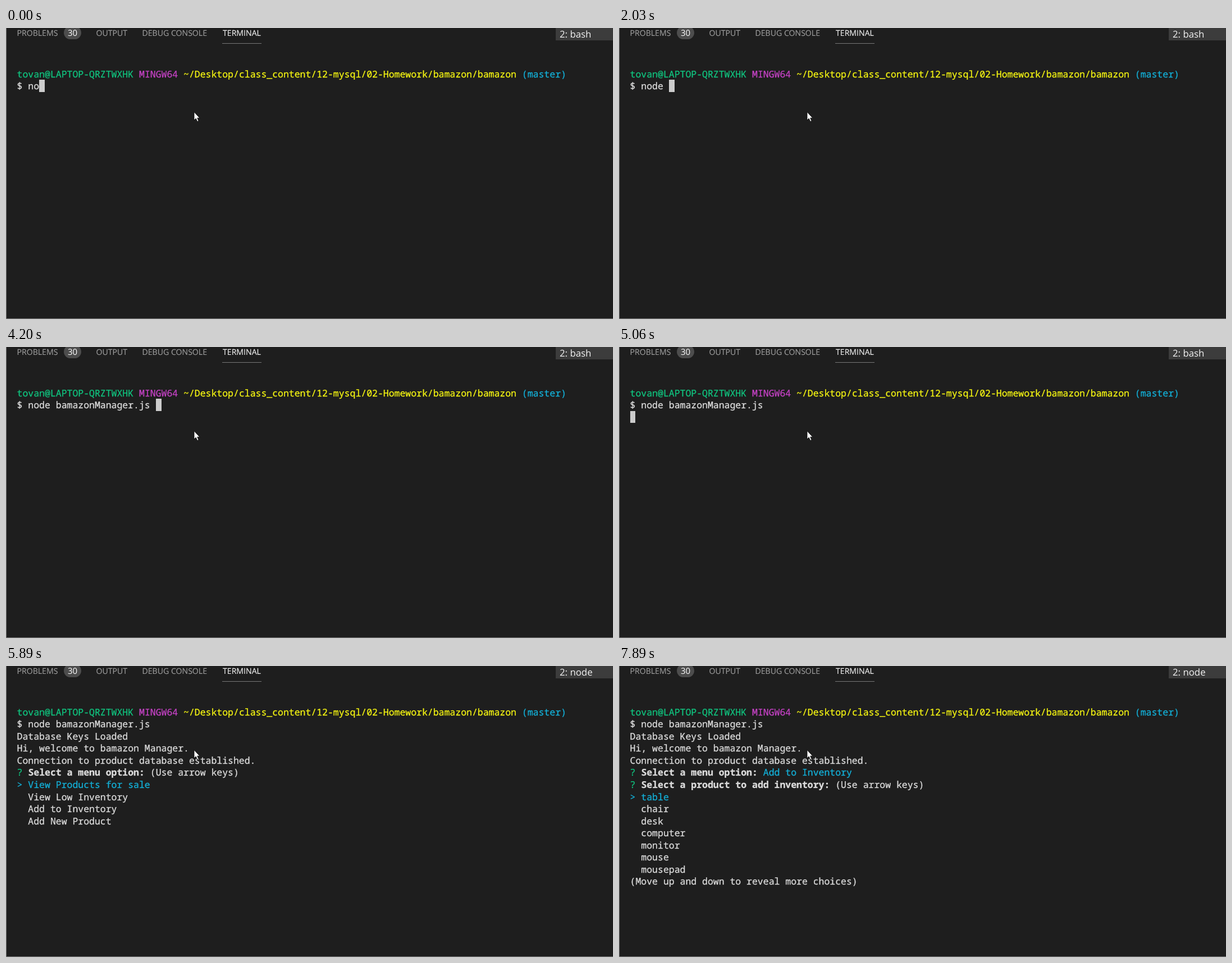
An HTML page that plays this animation: 1081 px wide and 518 px high, repeating every 8000 ms.

```html
<!DOCTYPE html>
<html lang="en">
<head>
<meta charset="utf-8">
<title>Terminal session</title>
<style>
  html, body { margin: 0; width: 100%; height: 100%; overflow: hidden; background: #1e1e1e; }
  #stage {
    position: relative; width: 1081px; height: 518px; overflow: hidden;
    background: #1e1e1e; font-family: "Open Sans", "Noto Sans", sans-serif;
    text-rendering: geometricPrecision;
  }
  #stage > * { position: absolute; box-sizing: border-box; }
  .tab {
    top: 0; font-size: 14.1px; line-height: 20px; color: #9c9c9c; white-space: nowrap;
    -webkit-text-stroke: .15px;
  }
  .active { color: #f0f0f0; }
  .underline { left: 385px; top: 27px; width: 70px; height: 1px; background: #777; }
  .badge {
    left: 103px; top: -3px; width: 31px; height: 23px; border-radius: 12px;
    background: #4d4d4d; color: #fff; font-size: 15px; line-height: 25px; text-align: center;
  }
  #shell {
    left: 979px; top: 0; width: 102px; height: 22px; padding-left: 7px;
    background: #3c3c3c; color: #f4f4f4; font-size: 16.8px; line-height: 21px; white-space: nowrap;
  }
  #screen, #cursor { font: 16.483px/21.57px "Noto Sans Mono", "DejaVu Sans Mono", monospace; }
  #screen {
    left: 19.6px; top: 70.6px; margin: 0; color: #dcdcdc; white-space: pre;
    -webkit-text-stroke: .3px;
  }
  #screen b { font-weight: 600; }
  #cursor { width: 1ch; height: 21.4px; background: #ccc; }
  .edge { inset: 0; border: solid #777; border-width: 0 0 1px 1px; }
  .g { color: #10c47f; }
  .m { color: #c542c5; }
  .y { color: #f5f511; }
  .c { color: #13b0d8; }
  svg { left: 0; top: 0; }
</style>
</head>
<body>
<div id="stage">
  <div class="tab" style="left:19.5px">PROBLEMS</div>
  <div class="badge">30</div>
  <div class="tab" style="left:160.5px">OUTPUT</div>
  <div class="tab" style="left:242.5px">DEBUG CONSOLE</div>
  <div class="tab active" style="left:386px">TERMINAL</div>
  <div class="underline"></div>
  <div id="shell"></div>
  <div id="cursor"></div>
  <pre id="screen"></pre>
  <div class="edge"></div>
  <svg width="1081" height="518">
    <path d="M335 149.5v14.6l3.2-3 2.5 5.4 2.4-1-2.4-5.3h4.2z" fill="#fff" stroke="#000" stroke-width=".8"/>
  </svg>
</div>
<script>
const LOOP = 8000;
const ROW = 21.57;
const $ = id => document.getElementById(id);
const paint = (cls, text) => `<span class="${cls}">${text}</span>`;
const ask = (question, rest) => `${paint('g', '?')} <b>${question}</b> ${rest}`;
const list = (items, chosen) => items.map((item, i) =>
  i === chosen ? paint('c', '&gt; ' + item) : '  ' + item);

const prompt = [
  paint('g', 'tovan@LAPTOP-QRZTWXHK'),
  paint('m', 'MINGW64'),
  paint('y', '~/Desktop/class_content/12-mysql/02-Homework/bamazon/bamazon'),
  paint('c', '(master)')
].join(' ');
const command = 'node bamazonManager.js ';
const loaded = ['Database Keys Loaded'];
const connected = [...loaded, 'Hi, welcome to bamazon Manager.',
  'Connection to product database established.'];
const hint = '(Use arrow keys)';
const options = ['View Products for sale', 'View Low Inventory', 'Add to Inventory', 'Add New Product'];
const products = ['table', 'chair', 'desk', 'computer', 'monitor', 'mouse', 'mousepad'];

const menu = (chosen, note) =>
  [...connected, ask('Select a menu option:', note), ...list(options, chosen)];
const picker = [
  ...connected,
  ask('Select a menu option:', paint('c', 'Add to Inventory')),
  ask('Select a product to add inventory:', hint),
  ...list(products, 0),
  '(Move up and down to reveal more choices)'
];

// [start ms, characters typed]
const typing = [[0, 2], [120, 3], [410, 4], [2030, 5], [2440, 7], [2840, 8],
  [2990, 12], [3780, 13], [3930, 14], [4200, 23]];

const steps = [
  ...typing.map(([at, typed]) => ({ at, typed, shell: 'bash', output: [], cursor: [typed + 2, 1] })),
  { at: 5060, shell: 'bash', output: [], cursor: [0, 2] },
  { at: 5180, output: loaded, cursor: [0, 3] },
  { at: 5340, output: connected, cursor: [0, 5] },
  { at: 5890, output: menu(0, hint) },
  { at: 6920, output: menu(1, '') },
  { at: 7070, output: menu(2, '') },
  { at: 7890, output: picker }
];

let shown;
function show({ typed = command.length, shell = 'node', output, cursor }) {
  $('shell').textContent = '2: ' + shell;
  $('screen').innerHTML = [prompt, '$ ' + command.slice(0, typed), ...output].join('\n');
  $('cursor').hidden = !cursor;
  if (cursor) {
    const [col, row] = cursor;
    $('cursor').style.left = `calc(19.6px + ${col}ch)`;
    $('cursor').style.top = 70.6 + row * ROW + 'px';
  }
}

function tick() {
  const time = performance.now() % LOOP;
  const step = steps.findLast(s => s.at <= time);
  if (step !== shown) show(shown = step);
  requestAnimationFrame(tick);
}
tick();
</script>
</body>
</html>
```
